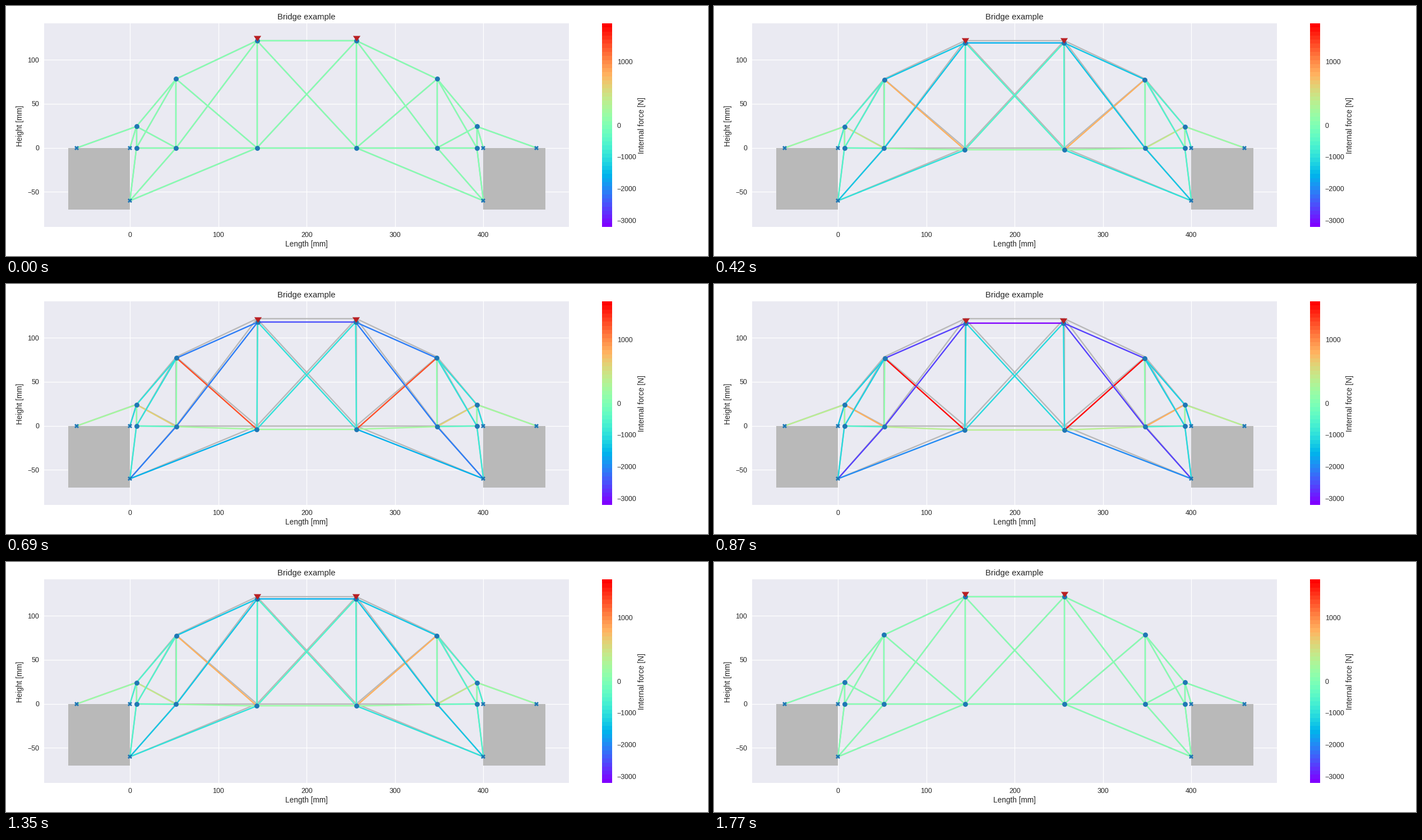
Write a matplotlib script that moves like this. It is 1252x447 px and loops after 1.8 s.

```python
import numpy as np
import matplotlib as mpl
import matplotlib.pyplot as plt
from matplotlib.animation import FuncAnimation
from matplotlib.collections import LineCollection
from matplotlib.patches import Rectangle

W, H, DPI = 1252, 447, 64
FRAMES, INTERVAL = 60, 30
LOADED = FRAMES // 2 - 1
SCALE = 1.576  # pixels per mm
INK, GREY, BLUE, RED = "#262626", "#b9b9b9", "#1f77b4", "#b91f23"
V_MIN, V_MAX = -3210, 1597

plt.rcParams["font.family"] = ["Liberation Sans", "DejaVu Sans"]


def pt(px):
    return px * 72 / DPI


def box(left, top, right, bottom):
    return [left / W, 1 - bottom / H, (right - left) / W, (bottom - top) / H]


# Left half of the bridge: position in mm, displacement at full load in pixels
NODES = {
    "anchor": (-60, 0, 0, 0),
    "edge": (0, 0, 0, 0),
    "foot": (0, -60, 0, 0),
    "a": (7.4, 24.3, 0.2, -0.5),
    "b": (7.4, 0, 0, -0.2),
    "c": (52.3, 78.2, 1.1, -2.5),
    "d": (52.3, 0, 0.1, -1.7),
    "e": (143.8, 121.6, 1.6, -7.7),
    "f": (143.8, 0, -0.3, -7.5),
}
FIXED = ("anchor", "edge", "foot")

# Member ends and share of the extreme force at full load
MEMBERS = [
    ("anchor", "a", 0.2), ("edge", "a", -0.43), ("foot", "b", -0.35),
    ("a", "b", 0.1), ("a", "c", -0.4), ("a", "d", 0.5),
    ("b", "c", -0.37), ("b", "d", -0.2), ("c", "d", 0.06),
    ("c", "e", -0.83), ("c", "f", 1.0), ("d", "e", -0.83),
    ("d", "f", 0.2), ("foot", "d", -0.83), ("foot", "f", -0.62),
    ("e", "f", -0.35),
]
CROSSING = [("e", "e*", -1.0), ("f", "f*", 0.2),
            ("e", "f*", -0.36), ("f", "e*", -0.36)]

rest, shift = {}, {}
for name, (x, y, dx, dy) in NODES.items():
    rest[name], shift[name] = (x, y), (dx / SCALE, dy / SCALE)
    rest[name + "*"], shift[name + "*"] = (400 - x, y), (-dx / SCALE, dy / SCALE)

members = MEMBERS + [(p + "*", q + "*", s) for p, q, s in MEMBERS] + CROSSING
names = list(rest)
start = np.array([rest[n] for n in names], float)
move = np.array([shift[n] for n in names])
ends = np.array([[names.index(p), names.index(q)] for p, q, _ in members])
share = np.array([s for _, _, s in members])
is_fixed = np.array([n.rstrip("*") in FIXED for n in names])
loads = [names.index("e"), names.index("e*")]
cmap = mpl.colormaps["rainbow"].resampled(50)

fig = plt.figure(figsize=(W / DPI, H / DPI), dpi=DPI, facecolor="white")


def clean(axes):
    for spine in axes.spines.values():
        spine.set_visible(False)
    axes.tick_params(length=0, pad=pt(8.7), labelsize=pt(12.42), labelcolor=INK)


def label(x, y, text, size, **style):
    fig.text(x / W, 1 - y / H, text, fontsize=pt(size), color=INK,
             ha="center", **style)


ax = fig.add_axes(box(68, 31, 1004.4, 395), facecolor="#eaeaf2")
clean(ax)
ax.set_xlim(200 - 468.2 / SCALE, 200 + 468.2 / SCALE)
ax.set_ylim(25.8 - 182 / SCALE, 25.8 + 182 / SCALE)
ax.set_xticks(range(0, 401, 100))
ax.set_yticks(range(-50, 101, 50))
ax.set_axisbelow(True)
ax.grid(color="white", lw=pt(1.24))
label(536, 24, "Bridge example", 14.9, va="baseline")
label(536, 426, "Length [mm]", 13.66, va="center")
label(25.5, 214, "Height [mm]", 13.66, va="center", rotation=90)

bar = fig.add_axes(box(1063, 31, 1081, 395))
clean(bar)
bar.imshow(np.arange(50)[:, None], cmap=cmap, origin="lower", aspect="auto",
           extent=(0, 1, -1, 1), interpolation="nearest")
bar.set_xticks([])
bar.yaxis.tick_right()
bar.tick_params(length=0, pad=pt(8.7))
forces = range(-3000, 1001, 1000)
bar.set_yticks([v / (V_MAX if v > 0 else -V_MIN) for v in forces],
               [str(v).replace("-", "\u2212") for v in forces])
label(1134, 214, "Internal force [N]", 13.66, va="center", rotation=90)

for x in (-70, 400):
    ax.add_patch(Rectangle((x, -70), 70, 70, fc=GREY, lw=0, zorder=2))


def truss(z):
    lines = LineCollection(start[ends], linewidths=pt(2.4), colors=GREY,
                           capstyle="round", zorder=z)
    ax.add_collection(lines, autolim=False)
    return lines


truss(3)
beams = truss(4)
ax.plot(*start[is_fixed].T, "X", ms=pt(8.7), mew=0, color=BLUE, zorder=5)
joints, = ax.plot([], [], "o", ms=pt(8.9), mew=0, color=BLUE, zorder=5)
arrows, = ax.plot([], [], ls="", marker=mpl.markers.CARETDOWN, ms=pt(12.6),
                  mew=pt(1), color=RED, zorder=6)


def draw(i):
    load = min(i, FRAMES - 1 - i) / LOADED
    pos = start + load * move
    beams.set_segments(pos[ends])
    beams.set_color(cmap(0.5 + 0.5 * load * share))
    joints.set_data(*pos[~is_fixed].T)
    arrows.set_data(*pos[loads].T)
    return beams, joints, arrows


anim = FuncAnimation(fig, draw, frames=FRAMES, interval=INTERVAL,
                     init_func=lambda: draw(0), repeat=True, repeat_delay=0)
plt.show()
```
